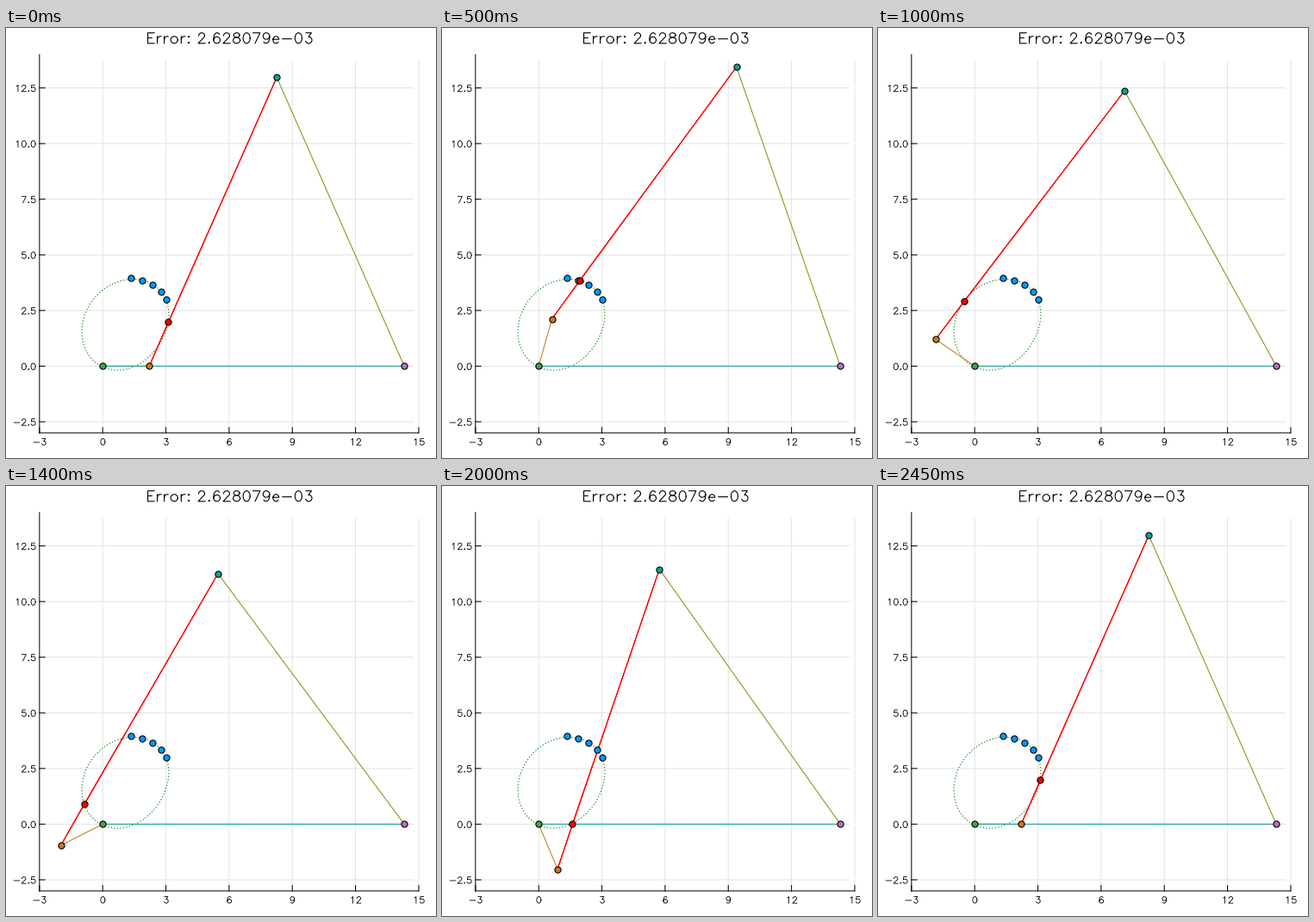
A matplotlib script that plays this animation: 499x499 px, repeating every 2.5 s.

```python
import numpy as np
import matplotlib.pyplot as plt
from matplotlib.animation import FuncAnimation

SIZE, DPI = 499, 100
PX = 72 / DPI
FRAMES, INTERVAL = 50, 50

CRANK, BAR = 2.209, 14.315      # ground, coupler and rocker share one length
ALONG, OFFSET = 2.17, 0.023     # tracing point relative to the coupler
PIVOT = np.array([BAR, 0.0])
TARGETS = [(1.35, 3.95), (1.89, 3.865), (2.37, 3.666), (2.76, 3.364), (3, 3)]


def to_px(x, y):
    return 112.2 + 24.45 * np.asarray(x), 392.4 - 25.83 * np.asarray(y)


LEFT, BOTTOM = to_px(-3, -3)
RIGHT, TOP = to_px(15, 14)


# Single-stroke lettering, cap height 21 units
def arc(cx, cy, rx, ry, start=0, end=360):
    t = np.radians(np.linspace(start, end, 25))
    return list(zip(cx + rx * np.cos(t), cy + ry * np.sin(t)))


def dot(y):
    return [(5, y + 1), (4, y), (5, y - 1), (6, y), (5, y + 1)]


SIX = [arc(11, 10, 7, 11, 50, 180) + arc(10.5, 6.5, 6.5, 6.5, 180, -180)]
GLYPHS = {
    " ": (11, []),
    ".": (10, [dot(1)]),
    ":": (10, [dot(1), dot(13)]),
    "-": (26, [[(4, 9), (22, 9)]]),
    "0": (20, [arc(10, 10.5, 7, 10.5)]),
    "1": (20, [[(6, 17), (8, 18), (11, 21), (11, 0)]]),
    "2": (20, [arc(10, 15.5, 6, 5.5, 180, -30) + [(3, 0), (17, 0)]]),
    "3": (20, [[(5, 21), (16, 21), (10, 13)] + arc(10.5, 6.5, 6.5, 6.5, 90, -160)]),
    "5": (20, [[(15, 21), (5, 21), (4, 12)] + arc(10, 7, 7, 7, 135, -155)]),
    "6": (20, SIX),
    "7": (20, [[(3, 21), (17, 21), (7, 0)]]),
    "8": (20, [arc(10, 16.5, 6, 4.5), arc(10, 6, 7, 6)]),
    "9": (20, [[(20 - x, 21 - y) for x, y in SIX[0]]]),
    "E": (19, [[(17, 21), (4, 21), (4, 0), (17, 0)], [(4, 11), (12, 11)]]),
    "r": (14, [[(4, 14), (4, 0)], arc(10.5, 7, 6.5, 7, 175, 80)]),
    "o": (20, [arc(10, 7, 7, 7)]),
    "e": (18, [[(3, 8)] + arc(9, 7, 6, 7, 8, 320)]),
}


def line(x, y, color="black", width=1.0, **kw):
    return ax.plot(x, y, color=color, lw=width * PX, snap=False, **kw)[0]


def write(text, x, baseline, scale, align=0.5, width=0.85):
    pen = x - align * scale * sum(GLYPHS[c][0] for c in text)
    for c in text:
        advance, strokes = GLYPHS[c]
        for stroke in strokes:
            gx, gy = np.array(stroke).T
            line(pen + scale * gx, baseline - scale * gy, width=width,
                 solid_joinstyle="round")
        pen += scale * advance


def marker(color, x=(), y=(), z=5):
    return line(*to_px(x, y), ls="none", marker="o", ms=7.2 * PX, mfc=color,
                mec="black", mew=1.1 * PX, zorder=z)


def linkage(angle):
    """Crank end, coupler-rocker joint and tracing point."""
    a = CRANK * np.array([np.cos(angle), np.sin(angle)])
    d = PIVOT - a
    dist = np.hypot(*d)
    normal = np.array([-d[1], d[0]]) / dist
    b = (a + PIVOT) / 2 + np.sqrt(BAR**2 - dist**2 / 4) * normal
    u = (b - a) / BAR
    p = a + ALONG * u + OFFSET * np.array([-u[1], u[0]])
    return a, b, p


fig = plt.figure(figsize=(SIZE / DPI, SIZE / DPI), dpi=DPI, facecolor="white")
ax = fig.add_axes([0, 0, 1, 1])
ax.set(xlim=(0, SIZE), ylim=(SIZE, 0))
ax.axis("off")

# Grid, ticks and labels
for v in range(-3, 16, 3):
    x, _ = to_px(v, 0)
    if v > -3:
        line([x, x], [37.8, BOTTOM], "#e3e3e3", zorder=1)
    line([x, x], [BOTTOM, BOTTOM - 6.3])
    write(str(v), x + 0.2, 484.1, 0.36)
for v in np.arange(-2.5, 13, 2.5):
    _, y = to_px(0, v)
    line([LEFT, 472.8], [y, y], "#e3e3e3", zorder=1)
    line([LEFT, LEFT + 6.3], [y, y])
    write(f"{v:.1f}", 35.2, y + 4.2, 0.36, align=1)
line([LEFT, LEFT], [TOP, BOTTOM])
line([LEFT, RIGHT], [BOTTOM, BOTTOM])
write("Error: 2.628079e-03", 259.5, 17.8, 0.579, width=1.1)

# Fixed parts
curve = np.array([linkage(t)[2] for t in np.linspace(0, 2 * np.pi, 200)])
line(*to_px(*curve.T), "#128a12", 1.1, ls=(0, (1.2, 2)), dash_capstyle="butt")

crank = line([], [], "#c68225", 1.1, zorder=3)
line(*to_px([0, BAR], [0, 0]), "#1a9f98", 1.1, zorder=3)
rocker = line([], [], "#8e971e", 1.1, zorder=3)
coupler = line([], [], "red", 1.0, zorder=4)

marker("#009afa", *zip(*TARGETS))
marker("#3da44d", 0, 0)
marker("#b870c0", *PIVOT)
crank_pin = marker("#c87a1c")
joint_pin = marker("#0f9f95")
tracer = marker("red", z=6)


def place(artist, *points):
    artist.set_data(*to_px(*np.array(points).T))


def update(i):
    a, b, p = linkage(2 * np.pi * i / (FRAMES - 1))
    place(crank, (0, 0), a)
    place(rocker, b, PIVOT)
    place(coupler, a, p, b, a)
    place(crank_pin, a)
    place(joint_pin, b)
    place(tracer, p)
    return crank, rocker, coupler, crank_pin, joint_pin, tracer


anim = FuncAnimation(fig, update, frames=FRAMES, interval=INTERVAL,
                     repeat=True, repeat_delay=0)
plt.show()
```
